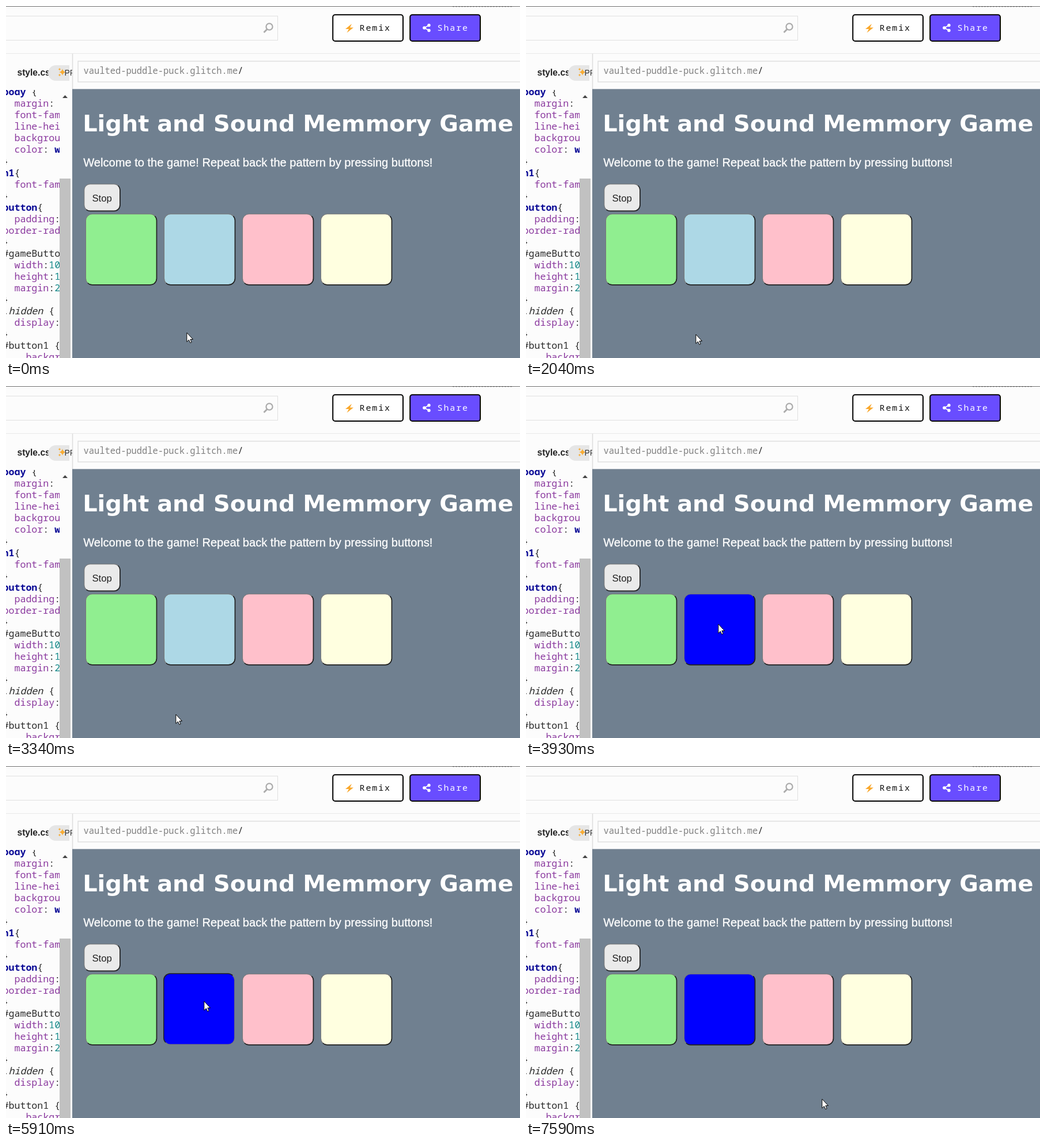
Write an HTML page that moves like this. It is 892 px wide and 612 px high and loops after 8 s.

```html
<!DOCTYPE html>
<html lang="en">
<head>
<meta charset="utf-8">
<title>Light and sound game</title>
<style>
  html, body { margin: 0; width: 100%; height: 100%; overflow: hidden; background: #fcfcfc; }
  svg { display: block; width: 892px; height: 612px; }
  text { white-space: pre; }
  .sans { font-family: "Liberation Sans", Arial, sans-serif; }
  .mono { font-family: "Noto Sans Mono", "DejaVu Sans Mono", monospace; }
  #code { font-size: 16.67px; }
  .tag { fill: #0a0a96; font-weight: 700; }
  .prop { fill: #8b3a9f; }
  .num { fill: #168a8a; }
  .sel { fill: #2b2b2b; }
  .cls { fill: #2b2b2b; font-style: italic; }
</style>
</head>
<body>
<svg viewBox="0 0 892 612" xmlns="http://www.w3.org/2000/svg">
  <defs>
    <linearGradient id="raised" x1="0" y1="0" x2="1" y2="1">
      <stop offset=".5" stop-color="#777777"/><stop offset=".5" stop-color="#202020"/>
    </linearGradient>
    <linearGradient id="sunken" x1="0" y1="0" x2="1" y2="1">
      <stop offset=".5" stop-color="#202020"/><stop offset=".5" stop-color="#777777"/>
    </linearGradient>
    <clipPath id="codeClip"><rect x="0" y="146" width="93" height="466"/></clipPath>
    <clipPath id="tabClip"><rect x="0" y="90" width="115" height="50"/></clipPath>
  </defs>
  <rect width="892" height="612" fill="#fcfcfc"/>

  <!-- header -->
  <rect width="892" height="1" fill="#6e6e6e"/>
  <path d="M775 1.5H880" stroke="#b5b5b5" stroke-dasharray="3 2"/>
  <path d="M0 82.5H892" stroke="#e8e8e8"/>
  <rect x="-9.5" y="17.5" width="481" height="42" fill="#fcfcfc" stroke="#e0e0e0"/>
  <g fill="none" stroke="#ababab" stroke-width="2.2">
    <circle cx="457" cy="36" r="5.6"/>
    <path d="M453 40.5L447.5 46" stroke-width="2.8"/>
  </g>
  <rect x="567.2" y="15.2" width="121.8" height="45.8" rx="4" fill="#fff" stroke="#000" stroke-width="2"/>
  <path d="M600 31L589 40H595L591.5 46.5L603 37.5H597Z" fill="#f9a72b"/>
  <rect x="701.2" y="15.2" width="121.8" height="45.8" rx="4" fill="#694dff" stroke="#000" stroke-width="2"/>
  <g fill="#fff" stroke="#fff" stroke-width="1.6">
    <path d="M734 33.5L726 38L734 42.5" fill="none"/>
    <g stroke="none">
      <circle cx="726" cy="38" r="2.8"/><circle cx="734" cy="33.5" r="2.7"/><circle cx="734" cy="42.5" r="2.7"/>
    </g>
  </g>
  <g class="mono" font-size="15" letter-spacing="1.9">
    <text x="613.5" y="43" fill="#111">Remix</text>
    <text x="748.5" y="43" fill="#fff">Share</text>
  </g>

  <!-- editor -->
  <g clip-path="url(#tabClip)">
    <text class="sans" x="19.5" y="121" font-size="15.6" font-weight="700" fill="#222">style.css</text>
    <rect x="73" y="103" width="60" height="27" rx="13.5" fill="#e6e6e6"/>
    <rect x="110" y="95" width="6" height="45" fill="#fcfcfc"/>
    <path d="M98 109Q98.8 114.2 104 115Q98.8 115.8 98 121Q97.2 115.8 92 115Q97.2 114.2 98 109Z
             M93 107.5Q93.3 109.7 95.5 110Q93.3 110.3 93 112.5Q92.7 110.3 90.5 110Q92.7 109.7 93 107.5Z
             M93 117.5Q93.3 119.7 95.5 120Q93.3 120.3 93 122.5Q92.7 120.3 90.5 120Q92.7 119.7 93 117.5Z" fill="#f8ab32"/>
    <text class="sans" x="101.5" y="120.5" font-size="14" fill="#333">PR</text>
  </g>
  <g id="code" class="mono" clip-path="url(#codeClip)"></g>
  <rect x="93" y="300" width="19" height="312" fill="#c1c1c1"/>
  <path d="M98 160L102.5 155L107 160Z" fill="#444"/>

  <!-- preview -->
  <path d="M115.5 83V612" stroke="#dcdcdc" stroke-width="1.5"/>
  <rect x="125" y="96" width="790" height="36" fill="#fcfcfc" stroke="#e0e0e0" stroke-width="1.5"/>
  <text class="mono" x="134.5" y="118" font-size="15.4" fill="#808080">vaulted-puddle-puck.glitch.me<tspan fill="#222">/</tspan></text>
  <rect x="115" y="144.4" width="777" height="468" fill="#708090"/>
  <text x="133.2" y="218" font-family="'DejaVu Sans', Verdana, sans-serif" font-weight="700" font-size="39.9" fill="#fff">Light and Sound Memmory Game</text>
  <text class="sans" x="134.2" y="279" font-size="20.1" fill="#fff" stroke="#fff" stroke-width=".3">Welcome to the game! Repeat back the pattern by pressing buttons!</text>
  <g id="buttons"></g>
  <text class="sans" x="149.5" y="340" font-size="16.67" fill="#222">Stop</text>
  <path id="cursor" d="M.8 1V16.8L4.4 13.5L6.8 18.7L9.1 17.6L6.9 12.5H11.5Z" fill="#fff" stroke="#000"/>
</svg>
<script>
const NS = "http://www.w3.org/2000/svg";
const LOOP = 8000;
const $ = id => document.getElementById(id);

function add(parent, tag, attrs, text) {
  const el = document.createElementNS(NS, tag);
  for (const k in attrs) el.setAttribute(k, attrs[k]);
  if (text) el.textContent = text;
  return parent.appendChild(el);
}

// Each line is a run of "class:text" parts separated by "|".
const lines = [
  "tag:body|sel: {", "prop:  margin|sel::", "prop:  font-family", "prop:  line-height",
  "prop:  background", "prop:  color|sel:: |tag:white", "sel:}", "tag:h1|sel:{",
  "prop:  font-family", "sel:}", "tag:button|sel:{", "prop:  padding|sel::",
  "prop:border-radius", "sel:}", "sel:#gameButtonArea", "prop:  width|sel::|num:100px",
  "prop:  height|sel::|num:100px", "prop:  margin|sel::|num:2px", "sel:}", "cls:.hidden|sel: {",
  "prop:  display|sel::", "sel:}", "sel:#button1 {", "prop:    background"
];
lines.forEach((line, i) => {
  const row = add($("code"), "text", { x: -5.6, y: 155.2 + 20.05 * i });
  for (const part of line.split("|")) {
    const cut = part.indexOf(":");
    add(row, "tspan", { class: part.slice(0, cut) }, part.slice(cut + 1));
  }
});

function addButton(x, y, w, h, r, fill) {
  const g = add($("buttons"), "g", { transform: `translate(${x} ${y})` });
  const edge = add(g, "rect", { width: w, height: h, rx: r, fill: "url(#raised)" });
  const face = add(g, "rect", { x: 1, y: 1, width: w - 2.7, height: h - 2.7, rx: r - 1.5, fill });
  return { g, edge, face, x, y };
}

addButton(135.3, 309.3, 63.4, 47.9, 11, "#eaeaea");
const pads = ["lightgreen", "lightblue", "pink", "lightyellow"]
  .map((c, i) => addButton(138 + 136 * i, 361.3, 124.3, 124.4, 12, c));
const blue = pads[1];

// Pointer positions: [start ms, x, y]
const moves = [
  [0, 313, 567], [450, 318, 503], [590, 318, 497], [900, 321, 442], [1040, 320, 433],
  [1760, 299, 543], [1900, 294, 567], [2040, 294, 570], [3490, 313, 532], [3640, 319, 520],
  [3780, 333, 429], [3930, 333, 413], [4790, 286, 575], [4930, 284, 587], [5210, 325, 475],
  [5340, 343, 412], [5480, 343, 408], [6900, 496, 558], [7040, 524, 587], [7190, 519, 584],
  [7320, 513, 578]
];
const lit = [[2460, 3340], [3780, 4660], [7590, LOOP]];
const pressed = [[1310, 1460], [5910, 6030]];
const within = (spans, t) => spans.some(([a, b]) => t >= a && t < b);

function render(t) {
  const [, x, y] = moves.filter(m => m[0] <= t).pop();
  $("cursor").setAttribute("transform", `translate(${x} ${y})`);
  const down = within(pressed, t);
  const shift = down ? 1 : 0;
  const inset = down ? 1.5 : 1;
  blue.g.setAttribute("transform", `translate(${blue.x - shift} ${blue.y - shift})`);
  blue.edge.setAttribute("fill", down ? "url(#sunken)" : "url(#raised)");
  blue.face.setAttribute("x", inset);
  blue.face.setAttribute("y", inset);
  blue.face.setAttribute("fill", down || within(lit, t) ? "blue" : "lightblue");
}

const start = performance.now();
function tick() {
  render((performance.now() - start) % LOOP);
  requestAnimationFrame(tick);
}
tick();
</script>
</body>
</html>
```
